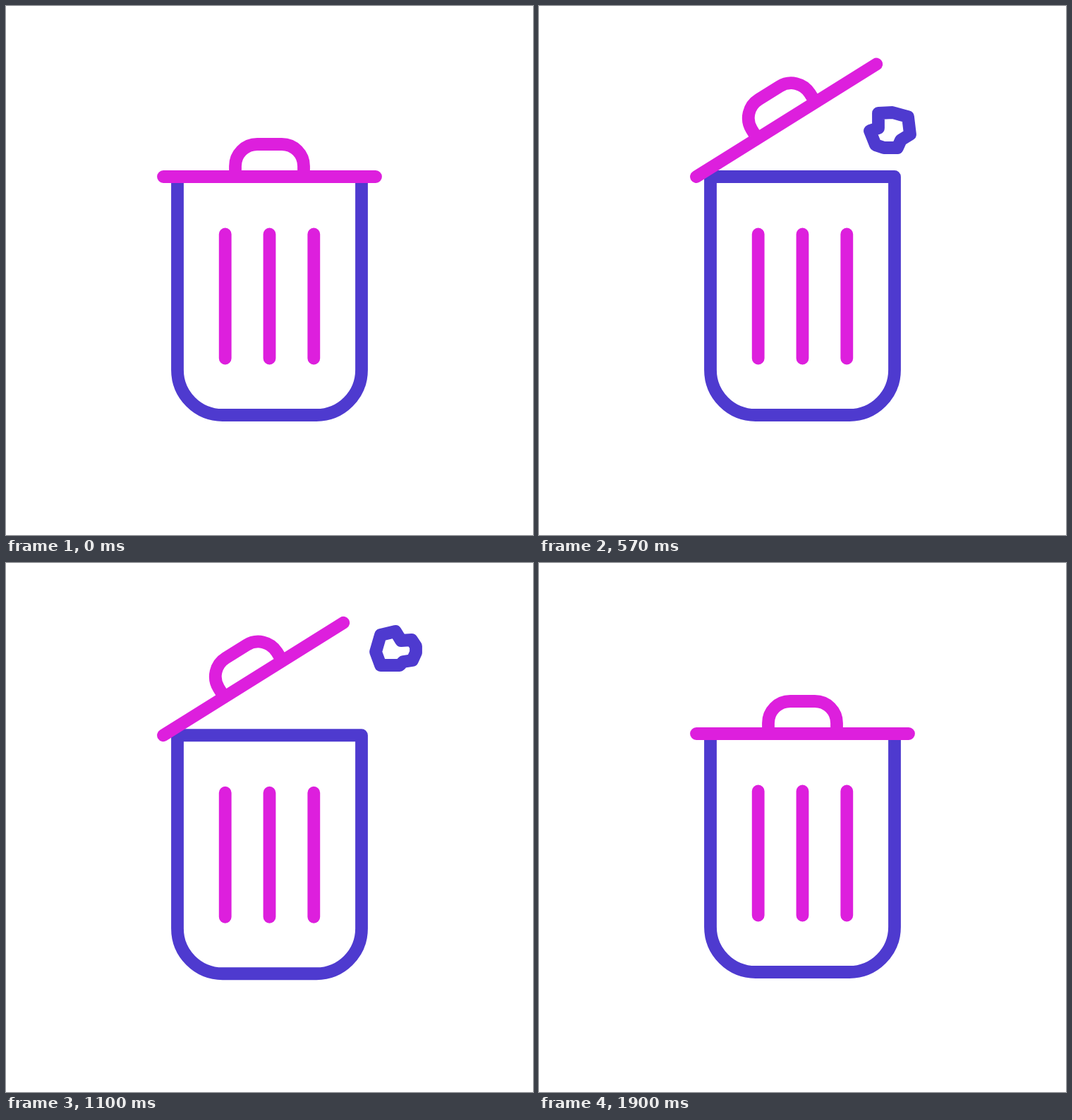
Animation, 747 px wide and 750 px high, one loop 2.26 s. Source, as an HTML page:

```html
<!DOCTYPE html>
<html lang="en">
<head>
<meta charset="utf-8">
<title>Trash bin</title>
<style>
  html, body { margin: 0; width: 100%; height: 100%; overflow: hidden; background: #fff; }
  svg { display: block; width: 100vw; height: 100vh; }
  path { fill: none; stroke-width: 17.8; stroke-linecap: round; stroke-linejoin: round; }
  .blue { stroke: #4e3acf; }
  .pink { stroke: #dd1fdd; }
  .body { fill: #fff; }
</style>
</head>
<body>
<svg viewBox="0 0 747 750">
  <clipPath id="above"><rect width="747" height="243"/></clipPath>
  <g id="balls" clip-path="url(#above)"></g>
  <g id="bin">
    <path class="blue body" d="M243 242H504V516A64 64 0 0 1 440 580H307A64 64 0 0 1 243 516Z"/>
    <path class="pink" d="M310.7 323.5V499.5M373.5 323.5V499.5M436.3 323.5V499.5"/>
    <g id="lid">
      <path class="pink" d="M223 242H524M325 242V227A31 31 0 0 1 356 196H391A31 31 0 0 1 422 227V242"/>
    </g>
  </g>
</svg>
<script>
const LOOP = 2260, FPS = 30;
const OPEN_ANGLE = -32, DIP = 8;
const $ = id => document.getElementById(id);

// Times below are in ticks of 1/30 s; `at` is when a ball is where its outline is drawn.
const balls = [
  { start: 10, length: 9, at: 17,
    d: "M481 152L501 151L523 157L526 182L513 190L508 201L489 201L477 197L469 177L481 173Z" },
  { start: 17, length: 10.6, at: 26,
    d: "M464 180L468 173L482 168L500 173L506 188L523 193L519 217L491 226L479 211L464 203Z" },
  { start: 25.57, length: 12.09, at: 33,
    d: "M524 126L531 102L552 97L560 110L575 109L581 118L581 127L576 138L563 140L558 145L531 145Z" }
];
const dips = [[1, 9], [19, 24.5], [28, 33.5], [40, 52]];
const arc = [[790, 100], [650, 91], [500, 66], [488, 270]];

const clamp = v => Math.min(1, Math.max(0, v));
const smooth = (t, a, b) => {
  const u = clamp((t - a) / (b - a));
  return u * u * (3 - 2 * u);
};

function arcPoint(u) {
  const v = 1 - u;
  const w = [v * v * v, 3 * v * v * u, 3 * v * u * u, u * u * u];
  return [0, 1].map(k => arc.reduce((sum, p, i) => sum + p[k] * w[i], 0));
}

for (const ball of balls) {
  ball.el = document.createElementNS("http://www.w3.org/2000/svg", "path");
  ball.el.setAttribute("class", "blue");
  ball.el.setAttribute("d", ball.d);
  ball.home = arcPoint((ball.at - ball.start) / ball.length);
  $("balls").append(ball.el);
}

function draw(ms) {
  const t = Math.floor((ms % LOOP + 3.5) * FPS / 1000);

  for (const { el, start, length, home } of balls) {
    const u = (t - start) / length;
    const visible = u > 0 && u < 1;
    el.style.display = visible ? "" : "none";
    if (!visible) continue;
    const [x, y] = arcPoint(u);
    el.setAttribute("transform", `translate(${x - home[0]} ${y - home[1]})`);
  }

  const dip = dips.reduce((sum, [a, b]) => sum + Math.sin(Math.PI * clamp((t - a) / (b - a))), 0);
  $("bin").setAttribute("transform", `translate(0 ${(dip * DIP).toFixed(2)})`);

  const open = smooth(t, 1, 10) - smooth(t, 45, 57);
  $("lid").setAttribute("transform", `rotate(${OPEN_ANGLE * open} 223 242)`);
}

const began = performance.now();
function tick() {
  draw(performance.now() - began);
  requestAnimationFrame(tick);
}
tick();
</script>
</body>
</html>
```
